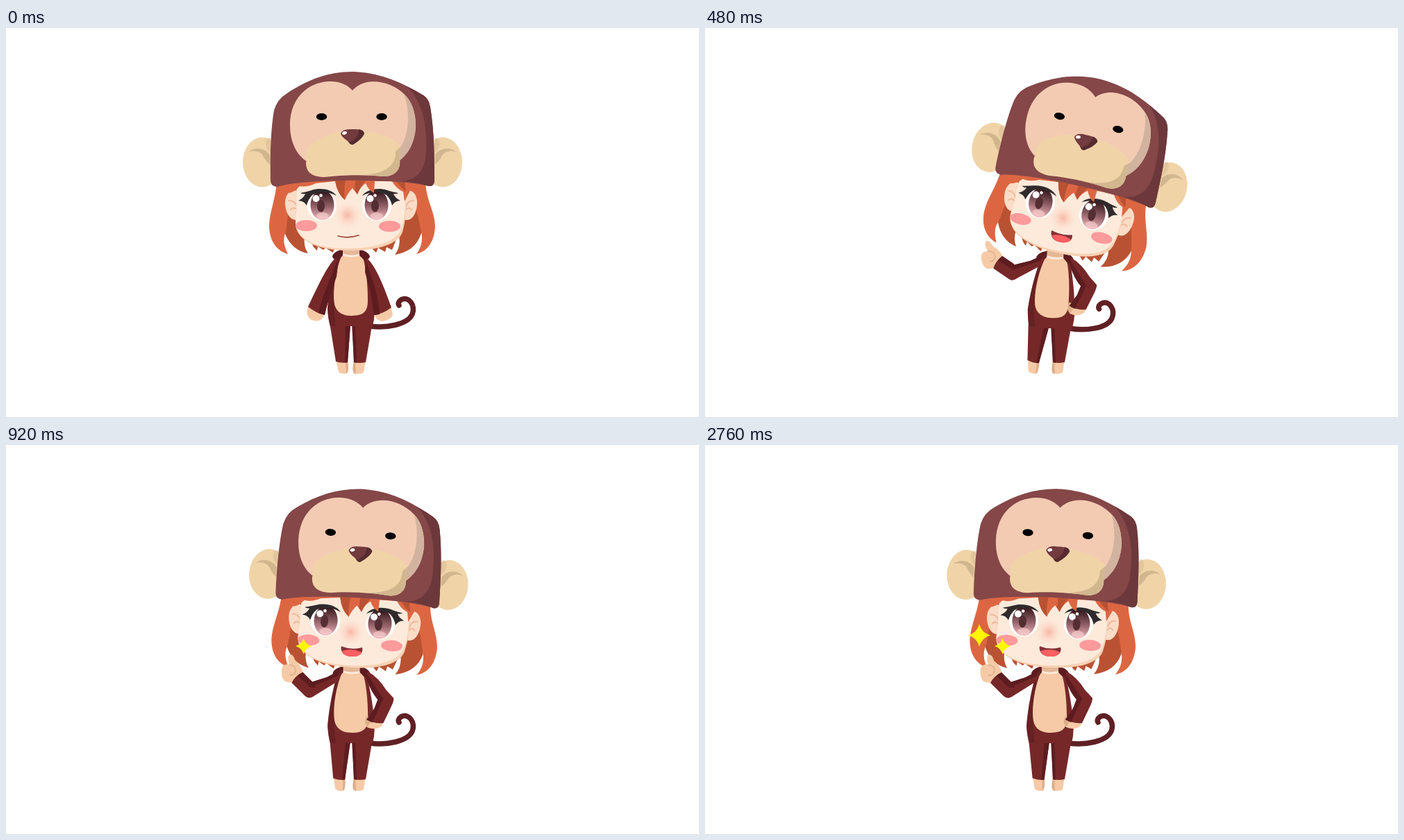
An HTML page that plays this animation: 998 px wide and 561 px high, repeating every 3000 ms.

```html
<!DOCTYPE html>
<html lang="en">
<head>
<meta charset="utf-8">
<title>Monkey costume thumbs-up</title>
<style>
  html, body { margin: 0; width: 100%; height: 100%; overflow: hidden; background: #fff; }
  svg { display: block; width: 100%; height: 100%; }
  .skin { fill: #f6caa6; }
  .skinShade { fill: #dcaf8b; }
  .suit { fill: #762829; }
  .suitDark { fill: #5d1c20; }
  .hair { fill: #dd6642; }
  .hairDark { fill: #b95232; }
  .fur { fill: #854748; }
  .furDark { fill: #6c383b; }
  .cream { fill: #f0d4a8; }
  .creamShade { fill: #d2b68e; }
  .star { fill: #fff700; }
  .line { fill: none; stroke-linecap: round; }
</style>
</head>
<body>
<svg viewBox="0 0 998 561">
  <defs>
    <linearGradient id="irisTone" x2="0" y2="1">
      <stop offset=".08" stop-color="#3b1c20"/>
      <stop offset=".55" stop-color="#94636a"/>
      <stop offset="1" stop-color="#f3b9bd"/>
    </linearGradient>
    <radialGradient id="noseTone">
      <stop stop-color="#f9b7a4"/>
      <stop offset="1" stop-color="#fdeadb" stop-opacity="0"/>
    </radialGradient>
    <g id="furEar">
      <ellipse class="cream" cx="369" cy="193.500" rx="28" ry="36"/>
      <path class="creamShade" d="M349 179C359 170 374 173 380 183V197Q375 192 372 188C369 179 359 175 349 179Z"/>
      <path class="creamShade" opacity=".45" d="M376 159Q370 170 381 180V158Z"/>
    </g>
    <g id="eyeShell">
      <ellipse cx="455" cy="256.500" rx="21" ry="21.500" fill="#fff"/>
    </g>
    <g id="iris">
      <ellipse cx="455.500" cy="255.500" rx="17" ry="21.500" fill="url(#irisTone)"/>
      <ellipse cx="453.500" cy="256.500" rx="5.500" ry="9" fill="#552e34"/>
      <ellipse cx="456" cy="271" rx="9" ry="5" fill="#fbd3d4" opacity=".6"/>
      <circle cx="446.500" cy="246" r="5" fill="#fff"/>
      <circle cx="453.500" cy="241.500" r="2.300" fill="#fff"/>
    </g>
    <path id="lash" fill="#302a2c" d="M421 249Q429 245 431 239Q427 240 424 238Q434 236 440 234C452 230 469 232 476 242C466 236 449 235 441 241Q435 247 433 256Q429 249 421 249Z"/>
    <path id="sparkle" class="star" d="M0-1Q.22-.22 1 0Q.22 .22 0 1Q-.22 .22-1 0Q-.22-.22 0-1Z"/>
  </defs>

  <path id="tail" class="line" stroke="#5f2024" stroke-width="7.500" d="M524 430C548 433 578 428 585 413C590 399 580 388 571 391C566 393 564 397 566 400"/>

  <g id="leftLeg">
    <path class="skin" d="M475 478L479 496Q484 500 491 498Q494 490 492 478Z"/>
    <path class="skinShade" d="M489 480L490 498L492 497Q494 490 492 480Z"/>
    <g id="leftTrouser">
      <path class="suit" d="M464 412L475 481Q484 484 492 482L496 428V412Z"/>
      <path class="suitDark" d="M489 425L488 483L492 482L496 428Z"/>
    </g>
  </g>
  <path class="skin" d="M501 478Q498 494 501 498Q509 500 515 497L518 478Z"/>
  <path class="skinShade" d="M501 480Q498 494 501 498L504 499L503 480Z"/>
  <g id="rightTrouser">
    <path class="suit" d="M499 412V430L501 482Q510 484 518 482L530 412Z"/>
    <path class="suitDark" d="M498 425L501 482L505 483L503 425Z"/>
  </g>

  <g id="torso">
    <path class="suit" d="M478 326C470 352 465 380 463 405Q464 421 467 430H528Q532 415 530 397C528 370 522 345 518 326Z"/>
    <path class="suitDark" opacity=".55" d="M478 326C470 352 465 380 463 405Q464 421 467 430H475C471 400 470 360 483 328Z"/>
    <path class="skin" d="M484 327C474 349 470 382 473 398C476 412 488 415 497 415C512 415 521 411 521 394C521 366 518 343 513 327Z"/>
    <path fill="#e4b797" d="M484 315H510V326Q497 330 484 326Z"/>
    <path class="line" stroke="#fbe9da" stroke-width="3" d="M485 327Q497 331 510 327"/>
    <path class="suitDark" d="M485 319V328L478 335Q470 334 470 329Q472 322 485 319ZM509 319V328L516 335Q524 334 524 329Q521 322 509 319Z"/>
  </g>

  <g id="head">
    <path class="hairDark" d="M430 290L443 316L448 321L449 315L457 320L460 317L471 324L473 317L480 319L484 300H520L528 319L533 324L536 317L546 323L548 316L556 320L568 290Z"/>
    <path class="hairDark" d="M402 220C400 260 397 280 402 297Q412 321 435 325Q428 315 430 300L425 220ZM570 220L566 300Q569 315 560 327Q590 322 598 296L603 220Z"/>
    <path class="hair" d="M390 220C388 250 379 265 379 287C380 310 392 322 406 326C399 311 399 304 403 293Q407 260 415 222ZM578 222Q592 260 598 294Q602 311 591 326C607 322 617 308 618 286C617 262 605 250 604 220Z"/>
    <path fill="#fbdcc6" d="M422 236C410 230 401 241 402 254C403 270 412 280 422 276ZM573 236C585 230 593 241 592 254C591 270 583 280 573 276Z"/>
    <path class="line" stroke="#efb89c" stroke-width="2" d="M407 249Q416 248 419 258M410 262Q414 257 419 262M587 249Q579 248 576 258M584 262Q580 257 576 262"/>
    <path fill="#f8d1b3" d="M421 214C416 240 420 258 417 280C416 304 444 321 495 321C549 321 570 306 572 290C578 270 576 235 574 214Z"/>
    <path fill="#fdeadb" d="M421 214C416 240 420 258 417 280C416 302 444 318 490 318C545 318 568 303 571 284C577 265 575 235 573 214Z"/>
    <circle cx="492" cy="270" r="22" fill="url(#noseTone)"/>
    <ellipse cx="432.500" cy="285" rx="15.500" ry="8" fill="#fc9a9c"/>
    <ellipse cx="552.500" cy="286" rx="15.500" ry="8" fill="#fc9a9c"/>

    <path id="smile" class="line" stroke="#9e4038" stroke-width="1.700" d="M478 300Q492 304 508 299"/>
    <g id="openMouth">
      <path fill="#843036" d="M480 291Q495 296 510 291Q512 296 509 300Q504 305 495 305Q486 305 482 300Q479 295 480 291Z"/>
      <path fill="#fb5f61" d="M481 298Q495 292 510 298Q506 305 495 305Q485 305 481 298Z"/>
    </g>

    <g id="eyes">
      <use href="#eyeShell"/>
      <use href="#eyeShell" x="79"/>
      <use href="#iris"/>
      <use href="#iris" x="78"/>
      <use href="#lash"/>
      <use href="#lash" transform="matrix(-1 0 0 1 989 0)"/>
    </g>
    <path id="creases" class="line" stroke="#c66f50" stroke-width="1.500" d="M427 235Q444 224 468 231M521 231Q545 224 562 235"/>

    <path class="hair" d="M404 216L408 238Q416 236 423 228Q434 230 446 224L474 221Q477 239 488 248Q492 238 499 231L506 240Q510 229 518 224Q522 234 530 238L531 221H556Q562 232 572 236L574 250Q579 240 592 216Z"/>
    <path class="hairDark" d="M474 220Q477 239 488 248Q486 234 489 220ZM503 220L502 234L506 240Q510 229 518 220ZM562 221Q568 230 576 236L574 220Z"/>

    <use href="#furEar"/>
    <use href="#furEar" transform="matrix(-1 0 0 1 998 0)"/>
    <path class="fur" d="M381 221C380 180 382 140 386 119Q390 103 405 94C435 74 465 63 499 63C535 64 565 75 601 97Q609 102 611 114C617 150 617 190 617 221Q616 229 609 228C570 217 430 217 391 229Q382 229 381 221Z"/>
    <path class="furDark" d="M577 84Q590 90 601 97Q609 102 611 114C617 150 617 190 617 221Q616 229 609 228Q590 222 570 221C592 219 604 204 605 180C607 145 602 108 577 84Z"/>
    <path fill="#f3cbb3" d="M499 90C486 76 463 73 441 83C418 95 409 117 409 140C409 165 419 187 440 196H560C580 184 590 160 590 140C590 120 583 104 573 95C551 74 515 71 499 90Z"/>
    <path fill="#d2b39f" d="M573 95C585 106 590 122 590 142C589 165 580 184 560 196V181C580 165 584 125 573 95Z"/>
    <path class="cream" d="M432 183C433 163 469 148 499 148C531 148 559 157 568 171Q565 181 567 190C569 207 557 215 542 214C515 211 480 212 459 215C438 215 432 206 432 194Q434 190 432 183Z"/>
    <path class="creamShade" d="M568 171Q565 181 567 190C569 207 557 215 542 214Q525 212 511 212C540 211 562 202 561 178Z"/>
    <path fill="#723b3e" d="M482 152Q485 145 498 146Q513 145 516 152Q513 160 500 168Q496 169 492 163Q483 157 482 152Z"/>
    <path fill="#562c30" d="M508 146Q515 147 516 152Q513 160 500 168Q496 169 494 165Q508 160 508 146Z"/>
    <ellipse cx="487.500" cy="151.500" rx="3.500" ry="2.200" fill="#fff" transform="rotate(-15 487.500 151.500)"/>
    <ellipse cx="454.500" cy="128" rx="7.700" ry="5"/>
    <ellipse cx="541" cy="128" rx="7.700" ry="5"/>
  </g>

  <g id="arms">
    <g id="straightArms">
      <g id="leftArm">
        <path class="skin" d="M437 399Q431 408 435 416Q440 424 451 422Q459 418 459 409Z"/>
        <path class="suit" d="M474 332C461 345 446 379 435 402Q446 411 459 414Q462 398 476 358L479 335Z"/>
        <path class="suitDark" d="M478 333C470 355 455 387 450 411L459 414Q462 398 476 358Z"/>
      </g>
      <g id="rightArm">
        <path class="skin" d="M530 410Q531 421 541 423Q553 422 557 414L554 400Z"/>
        <path class="suit" d="M520 332C534 345 546 378 555 403Q544 412 530 414Q528 390 517 345Z"/>
        <path class="suitDark" d="M518 334C527 360 537 388 538 413L530 414Q528 390 517 352Z"/>
      </g>
    </g>
    <g id="bentArms">
      <path class="suit" d="M484 323L462 335L440 342L433 356L436 365L442 363L477 341Z"/>
      <path class="suitDark" d="M484 323L462 335L440 342L438 350L476 334Z"/>
      <g id="forearm">
        <path class="skin" d="M397 322Q400 315 408 317Q404 307 408 302Q414 302 416 311Q424 317 428 329L414 342Q405 344 400 340Q395 333 397 322Z"/>
        <path class="line" stroke="#dcaf8b" stroke-width="1.500" d="M408 317Q417 318 417 326Q415 333 408 332"/>
        <path class="suit" d="M427 328Q416 333 411 343L430 362Q435 367 442 363L447 352L440 341Z"/>
        <path class="suitDark" d="M427 328Q422 330 420 333L438 350L446 350L440 341Z"/>
      </g>
      <g id="hipArm">
        <path class="skin" d="M519 391Q514 401 520 407Q532 412 541 405L543 398Z"/>
        <path class="skinShade" d="M519 391Q514 401 520 406Q524 403 526 396Z"/>
        <path class="suit" d="M520 326Q536 335 547 353L558 365Q558 370 554 378L543 401Q530 402 519 396L530 380L535 367Q526 357 519 338Z"/>
        <path class="suitDark" d="M519 330Q530 346 543 366L527 400L519 396L530 380L535 367Q526 357 519 338Z"/>
      </g>
    </g>
  </g>

  <use id="smallStar" href="#sparkle" transform="translate(428.500 290) scale(11.500)"/>
  <use id="bigStar" href="#sparkle" transform="translate(395 274.500) scale(16)"/>
</svg>
<script>
const part = {};
document.querySelectorAll('[id]').forEach(el => part[el.id] = el);

// time, head angle, head x, head y, lean, drop, leg angle, arm swing, forearm angle, tail angle
const poses = [
  [0, 0, 0, 0, 0, 0, 0, 0, 0, 0],
  [340, -6, 1.5, 11, 0, 11, 0, 23, 0, 24],
  [400, -5, 1.5, 9.7, 0, 9.7, 0, 21, 0, 24],
  [480, 12.7, 11.6, 3.2, 4, 3, 11, 0, -15, 3],
  [570, 17.3, 17, 1, 6, 1, 15, 0, -20, 0],
  [680, 7, 4.3, 0, 2, 0, 6.5, 0, -3, 0],
  [800, 4.2, 1.5, 0, .7, 0, 4.5, 0, -1, 0],
  [1120, 3, .2, 0, 0, 0, 3.5, 0, 0, 0]
];
// openness of the eyes from each time on
const blinks = [[0, 1], [1160, .8], [1200, .12], [1240, .8], [1280, 1],
  [2480, .8], [2560, .12], [2680, .8], [2760, 1]];

const clamp01 = x => Math.max(0, Math.min(1, x));
const slope = (i, c) => (poses[i + 1][c] - poses[i][c]) / (poses[i + 1][0] - poses[i][0]);

// Harmonic-mean tangents keep the curve smooth without overshoot.
function tangent(i, c) {
  if (i === 0 || i === poses.length - 1) return 0;
  const a = slope(i - 1, c), b = slope(i, c);
  return a * b > 0 ? 2 * a * b / (a + b) : 0;
}

function poseAt(t) {
  const time = Math.min(t, 1120);
  let i = 0;
  while (i < poses.length - 2 && time >= poses[i + 1][0]) i++;
  const from = poses[i], to = poses[i + 1], span = to[0] - from[0];
  const u = (time - from[0]) / span, v = 1 - u;
  return from.slice(1).map((value, k) => {
    const c = k + 1;
    return value * v * v * (1 + 2 * u) + to[c] * u * u * (3 - 2 * u)
      + span * (tangent(i, c) * u * v * v - tangent(i + 1, c) * u * u * v);
  });
}

const move = (name, transform) => part[name].setAttribute('transform', transform);
const show = (name, visible) => part[name].setAttribute('visibility', visible ? 'visible' : 'hidden');

function render(t) {
  const [angle, x, y, lean, drop, leg, swing, fore, tail] = poseAt(t);
  const bent = t >= 440, talking = t >= 200;
  const body = `translate(0 ${drop}) rotate(${lean} 497 430)`;
  const squash = `translate(0 483) scale(1 ${1 - drop / 55}) translate(0 -483)`;

  move('head', `translate(${x} ${y}) rotate(${angle} 495 325)`);
  move('torso', body);
  move('arms', body);
  move('leftLeg', `rotate(${leg} 481 425)`);
  move('leftTrouser', squash);
  move('rightTrouser', squash);
  move('tail', `translate(0 ${drop}) rotate(${tail} 525 430)`);
  move('leftArm', `rotate(${swing} 476 336)`);
  move('rightArm', `rotate(${-swing * .86} 520 336)`);
  move('forearm', `rotate(${fore} 436 352)`);
  move('hipArm', `rotate(${fore * .2} 521 332)`);
  show('straightArms', !bent);
  show('bentArms', bent);
  show('smile', !talking);
  show('openMouth', talking);

  const open = blinks.filter(b => b[0] <= t).pop()[1];
  move('eyes', `translate(0 ${277 * (1 - open)}) scale(1 ${open})`);
  show('creases', open < 1);
  part.smallStar.setAttribute('opacity', clamp01((t - 600) / 200));
  part.bigStar.setAttribute('opacity', clamp01((t - 1000) / 280));
}

const start = performance.now();
function tick() {
  const t = (performance.now() - start) % 3000;
  render(Math.floor(t / 40) * 40);
  requestAnimationFrame(tick);
}
tick();
</script>
</body>
</html>
```
